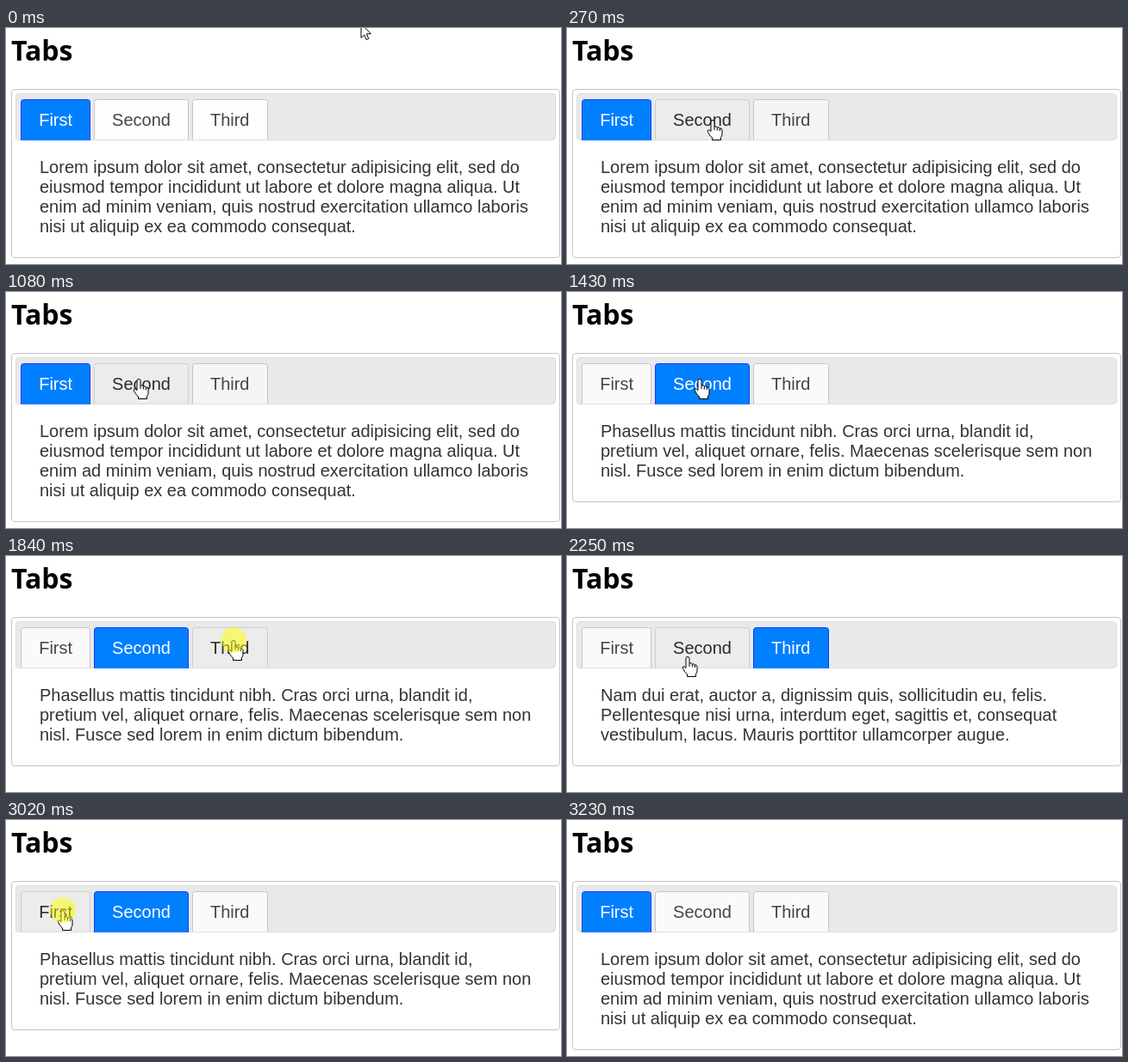
Recreate the animation shown at these times as an HTML page. Size 644 by 275 pixels, loop 3.84 s.

```html
<!DOCTYPE html>
<html lang="en">
<head>
<meta charset="utf-8">
<title>Tabs</title>
<style>
html, body { margin: 0; width: 100%; height: 100%; overflow: hidden; background: #fff; }
svg { display: block; width: 644px; height: 275px; }
text { font: 20px "Liberation Sans", Arial, sans-serif; white-space: pre; }
.title { font: bold 32px "Open Sans", "Noto Sans", sans-serif; }
</style>
</head>
<body>
<svg viewBox="0 0 644 275">
  <rect width="644" height="275" fill="#fff"/>
  <text class="title" x="6" y="38">Tabs</text>
  <rect id="panel" x="6.5" y="71.5" width="636" height="196" rx="3.5" fill="#fff" stroke="#c5c5c5"/>
  <rect x="11.5" y="76.5" width="626" height="54" rx="3.5" fill="#e9e9e9" stroke="#ddd"/>
  <g id="tabs"></g>
  <g id="pages" fill="#333"></g>
  <g id="cursor" stroke="#000" stroke-linejoin="round">
    <path id="arrow" fill="#fff" d="M0 0V16.5L3.8 13L6.2 18.6L8.8 17.5L6.4 11.8H11.4Z"/>
    <g id="hand">
      <path fill="#fff" d="M-2 2Q-2 .5 0 .5Q2 .5 2 2V8Q5 7 5.3 9Q8 8.2 8.4 10Q11 9.5 11 12V17Q11 19 9.5 20.5V23.5H-.5V21Q-3 18.5-4.5 16Q-6.5 13-5.5 12Q-4 11-2 13.5Z"/>
      <path fill="none" d="M2 8V12M5.3 9V12.5M8.4 10V13"/>
    </g>
  </g>
  <circle id="click" r="15" fill="#ff0" fill-opacity=".5"/>
</svg>
<script>
const LOOP = 3840, STEP = 67.5, EXIT = 3230;
const LINE = 23;
const byId = id => document.getElementById(id);

function set(el, attrs) {
  for (const key in attrs) el.setAttribute(key, attrs[key]);
}
function add(parent, name, attrs = {}, content = "") {
  const el = document.createElementNS("http://www.w3.org/2000/svg", name);
  set(el, attrs);
  el.textContent = content;
  return parent.appendChild(el);
}
const show = (el, on) => set(el, { visibility: on ? "visible" : "hidden" });

const pages = [
  ["Lorem ipsum dolor sit amet, consectetur adipisicing elit, sed do",
   "eiusmod tempor incididunt ut labore et dolore magna aliqua. Ut",
   "enim ad minim veniam, quis nostrud exercitation ullamco laboris",
   "nisi ut aliquip ex ea commodo consequat."],
  ["Phasellus mattis tincidunt nibh. Cras orci urna, blandit id,",
   "pretium vel, aliquet ornare, felis. Maecenas scelerisque sem non",
   "nisl. Fusce sed lorem in enim dictum bibendum."],
  ["Nam dui erat, auctor a, dignissim quis, sollicitudin eu, felis.",
   "Pellentesque nisi urna, interdum eget, sagittis et, consequat",
   "vestibulum, lacus. Mauris porttitor ullamcorper augue."]
];
const blocks = pages.map(lines => {
  const g = add(byId("pages"), "g");
  lines.forEach((line, i) => add(g, "text", { x: 39, y: 169 + LINE * i }, line));
  return g;
});

// each tab is as wide as its label plus padding
let edge = 17;
const tabs = ["First", "Second", "Third"].map(label => {
  const shape = add(byId("tabs"), "path");
  const text = add(byId("tabs"), "text", { x: edge + 21.2, y: 114 }, label);
  const end = edge + text.getComputedTextLength() + 42;
  const tab = { shape, text, left: Math.round(edge), right: Math.ceil(end) };
  edge = end + 4;
  return tab;
});

// pointer glides; a bend is the control point of a curved one
const home = [412, -5];
const glides = [
  { from: 0, until: 608, to: [99, 91], bend: [193, 150] },
  { from: 800, until: 1080, to: [154, 101] },
  { from: 1430, until: 1840, to: [264.5, 98] },
  { from: 1970, until: 2250, to: [140, 117] },
  { from: 2250, until: 2530, to: [137, 117] },
  { from: 2530, until: 3020, to: [66, 105] },
  { from: 3090, until: 3160, to: [74, 59] }
];
const clicks = [
  { press: 1360, open: 1430, tab: 1 },
  { press: 1840, open: 1970, tab: 2 },
  { press: 2460, open: 2530, tab: 1 },
  { press: 3020, open: 3090, tab: 0 }
];

const easeOut = p => 1 - (1 - p) ** 2;

function pointerAt(t) {
  const i = glides.findLastIndex(g => g.from <= t);
  const { from, until, to, bend } = glides[i];
  const start = i ? glides[i - 1].to : home;
  const stepped = Math.floor((t - from) / STEP) * STEP;
  const k = easeOut(Math.min(1, stepped / (until - from)));
  return start.map((a, axis) => {
    const b = to[axis], mid = bend ? bend[axis] : (a + b) / 2;
    return (1 - k) ** 2 * a + 2 * k * (1 - k) * mid + k * k * b;
  });
}

function drawTab({ shape, text, left, right }, active, hover, idle) {
  const l = left + .5, r = right - .5, bottom = active ? 131 : 130;
  set(shape, {
    d: `M${l} ${bottom}V86.5Q${l} 83.5 ${l + 3} 83.5H${r - 3}Q${r} 83.5 ${r} 86.5V${bottom}`,
    fill: active ? "#007fff" : hover ? "#ececec" : idle,
    stroke: active ? "#003eff" : hover ? "#ccc" : "#c5c5c5"
  });
  set(text, { fill: active ? "#fff" : hover ? "#2b2b2b" : "#454545" });
}

function draw(t) {
  const [x, y] = pointerAt(t);
  const present = t < EXIT;
  const opened = clicks.findLast(c => c.open <= t);
  const active = opened ? opened.tab : 0;
  const over = present && y >= 83 && y <= 131
    ? tabs.findIndex(tab => x >= tab.left && x <= tab.right) : -1;
  const idle = opened ? "#fafafa" : t < 2 * STEP ? "#fdfdfd" : "#f5f5f5";

  tabs.forEach((tab, i) => drawTab(tab, i === active, i === over, idle));
  blocks.forEach((block, i) => show(block, i === active));
  set(byId("panel"), { height: 104 + LINE * pages[active].length });

  show(byId("arrow"), present && over < 0);
  show(byId("hand"), present && over >= 0);
  set(byId("cursor"), { transform: `translate(${Math.round(x)} ${Math.round(y)})` });
  set(byId("click"), { cx: x, cy: y });
  show(byId("click"), clicks.some(c => t >= c.press && t < c.open));
}

const begin = performance.now();
function tick() {
  draw((performance.now() - begin) % LOOP);
  requestAnimationFrame(tick);
}
tick();
</script>
</body>
</html>
```
